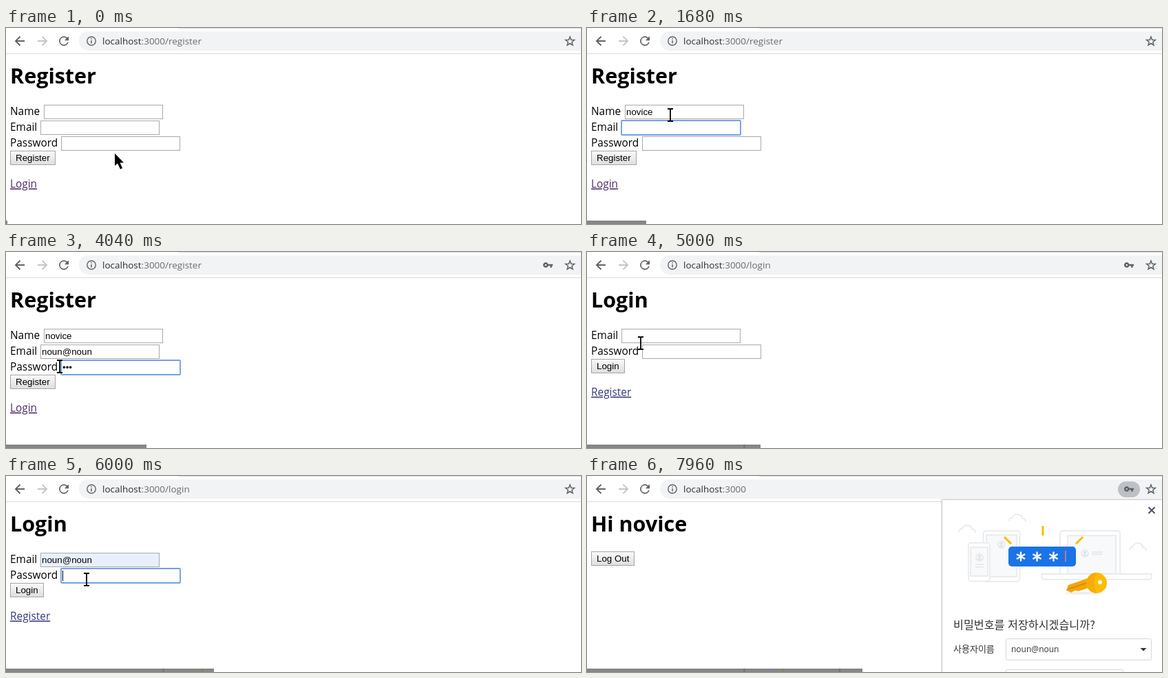
An HTML page for the animation above (8 s loop, 835 by 286 pixels).

```html
<!DOCTYPE html>
<html lang="ko">
<head>
<meta charset="utf-8">
<title>Register and log in</title>
<style>
  html, body { margin: 0; width: 100%; height: 100%; overflow: hidden; background: #fff; }
  svg { display: block; width: 835px; height: 286px; }
  text { font-family: "Open Sans", "Noto Sans", sans-serif; white-space: pre; }
  .heading { font-size: 30.5px; font-weight: 700; }
  .body { font-size: 15.4px; }
  .control { font: 13.333px "Liberation Sans", Arial, sans-serif; }
  .address { font-size: 13.5px; fill: #2b2e31; }
  .korean { font-family: "Noto Sans CJK KR", "Noto Sans CJK", sans-serif; fill: #333; }
</style>
</head>
<body>
<svg viewBox="0 0 835 286">
  <defs>
    <linearGradient id="button" x2="0" y2="1">
      <stop stop-color="#fafafa"/><stop offset="1" stop-color="#dedede"/>
    </linearGradient>
  </defs>
  <g id="toolbar">
    <path d="M250 0H835V1H250Z" fill="#dee1e6"/>
    <path d="M0 37H835V38H0Z" fill="#d9dbde"/>
    <path d="M120 5H835V33H120A14 14 0 0 1 120 5Z" fill="#f1f3f4"/>
    <g fill="none" stroke="#5f6368" stroke-width="1.9">
      <path d="M27 19H14.5M20.5 12.5L14 19L20.5 25.5"/>
      <path d="M46 19H58.5M52.5 12.5L59 19L52.5 25.5" stroke="#c3c5c8"/>
      <circle cx="124" cy="19" r="6.2" stroke-width="1.4"/>
      <path d="M124 18V22.5M124 15V16.6" stroke-width="1.5"/>
      <path id="star" stroke-width="1.5"/>
    </g>
    <path transform="translate(73.6 8.6) scale(.87)" fill="#5f6368"
      d="M17.65 6.35A7.96 7.96 0 0 0 12 4a8 8 0 1 0 7.73 10h-2.08A6 6 0 1 1 12 6c1.66 0 3.14.69 4.22 1.78L13 11h7V4z"/>
  </g>
  <g id="scene"></g>
</svg>
<script>
const LOOP = 8000, STEP = 40;
const USER = "novice", EMAIL = "noun@noun", SECRET = "•••";
const scene = document.getElementById("scene");
const ruler = document.createElement("canvas").getContext("2d");
ruler.font = '13.333px "Liberation Sans", Arial, sans-serif';

const starPoints = Array.from({ length: 10 }, (_, i) => {
  const r = i % 2 ? 2.9 : 6.8, a = i * Math.PI / 5;
  return `${819 + r * Math.sin(a)} ${19.6 - r * Math.cos(a)}`;
});
document.getElementById("star").setAttribute("d", `M${starPoints.join("L")}Z`);

// Pointer hotspot: time, x, y
const pointerPath = [
  [0, 158, 183], [160, 158, 183], [400, 121, 127], [3640, 121, 127],
  [4000, 78, 167], [4040, 78, 167], [4160, 44, 188], [4440, 44, 188],
  [4840, 78, 133], [5080, 78, 133], [5240, 100, 124], [5640, 100, 124],
  [5840, 117, 151], [6400, 117, 151], [6680, 34, 170], [7280, 34, 170],
  [7560, 237, 199], [7680, 250, 290], [LOOP, 250, 290]
];

const clamp = v => Math.max(0, Math.min(1, v));
const between = (t, from, to) => t >= from && t < to;
const typed = (word, t, start, gap) =>
  word.slice(0, Math.max(0, Math.floor((t - start) / gap) + 1));
const text = (cls, x, y, content, extra = "") =>
  `<text class="${cls}" x="${x}" y="${y}" ${extra}>${content}</text>`;
const box = (x, y, w, h, extra) =>
  `<rect x="${x}" y="${y}" width="${w}" height="${h}" ${extra}/>`;

function pointerAt(t) {
  const i = pointerPath.findIndex((p, n) => n && t <= p[0]);
  const [t0, x0, y0] = pointerPath[i - 1], [t1, x1, y1] = pointerPath[i];
  const p = (t - t0) / (t1 - t0), e = p * p * (3 - 2 * p);
  return [x0 + (x1 - x0) * e, y0 + (y1 - y0) * e];
}

function pointer(t) {
  const [x, y] = pointerAt(t);
  const beam = between(t, 320, 4120) || between(t, 4640, 6560);
  return `<g transform="translate(${x} ${y})">` + (beam
    ? `<path d="M-4 -9H-1L0 -8L1 -9H4M0 -8V8M-4 9H-1L0 8L1 9H4" fill="none" stroke="#000" stroke-width="1.8"/>`
    : `<path d="M0 0V18L4 14.5L8 23L11 21.5L7.5 13.5H13Z"/>`) + "</g>";
}

// blinkFrom is the moment the caret last became solid
function field(label, x, y, value, { focus, blinkFrom, t, fill = "#fff" }) {
  let out = text("body", 6, y + 15, label) +
    box(x + .5, y + .5, 172, 20, `fill="${fill}" stroke="#a9a9a9"`) +
    text("control", x + 2, y + 15, value);
  if (focus) {
    out += box(x, y, 173, 21, 'rx="1" fill="none" stroke="#729fe9" stroke-width="1.8"');
    if ((t - blinkFrom) % 1000 < 500)
      out += box(Math.round(x + 2 + ruler.measureText(value).width), y + 3, 1, 15, "");
  }
  return out;
}

const button = (label, y, w, pressed) =>
  box(6.5, y + .5, w - 1, 20, `fill="${pressed ? "#d5d5d5" : "url(#button)"}" stroke="#a6a6a6"`) +
  text("control", 14, y + 15, label);

const link = (label, y, color) =>
  text("body", 6, y, label, `fill="${color}" text-decoration="underline"`);

function registerPage(t) {
  const lastKey = (focusTime, start, gap, count) =>
    t < start ? focusTime : Math.min(t, start + gap * (count - 1));
  return text("heading", 6, 81, "Register") +
    field("Name", 55, 112, typed(USER, t, 640, 80),
      { t, focus: between(t, 440, 1160), blinkFrom: lastKey(440, 640, 80, 6) }) +
    field("Email", 50, 135, typed(EMAIL, t, 1760, 80),
      { t, focus: between(t, 1160, 2720), blinkFrom: lastKey(1160, 1760, 80, 9) }) +
    field("Password", 80, 158, typed(SECRET, t, 3240, 120),
      { t, focus: t >= 2720, blinkFrom: lastKey(2720, 3240, 120, 3) }) +
    button("Register", 179, 66, t >= 4160) + link("Login", 233, "#4f2a68");
}

function loginPage(t) {
  const filled = t >= 5600;
  return text("heading", 6, 81, "Login") +
    field("Email", 50, 112, filled ? EMAIL : "",
      { t, focus: between(t, 5280, 5840), blinkFrom: 5280, fill: filled ? "#e8f0fe" : "#fff" }) +
    field("Password", 80, 135, typed(SECRET, t, 6120, 120),
      { t, focus: t >= 5840, blinkFrom: t < 6120 ? 5840 : Math.min(t, 6360) }) +
    button("Login", 156, 49, t >= 6800) + link("Register", 210, "#34397c");
}

const homePage = () => text("heading", 6, 81, `Hi ${USER}`) + button("Log Out", 110, 63);

function keyIcon(t) {
  if (!(between(t, 3440, 5200) || t >= 6160)) return "";
  const shade = t < 7160 ? "none" : t < 7320 ? "#e3e5e7" : "#bdc1c6";
  return box(771, 8, 32, 23, `rx="11.5" fill="${shade}"`) +
    `<path transform="translate(779.3 11.3) scale(.64)" fill="#5f6368" fill-rule="evenodd"
      d="M12.65 10A6 6 0 1 0 12.65 14H17V18H21V14H23V10ZM7 14A2 2 0 1 1 7 10A2 2 0 1 1 7 14Z"/>`;
}

const cloud = (x, y) =>
  `<path d="M${x} ${y}q0 -5 5 -5q2 -6 8 -5q6 1 6 6q5 0 5 5"/>`;
const person = (x, y) =>
  `<circle cx="${x}" cy="${y}" r="5"/><circle cx="${x}" cy="${y - 1.5}" r="1.6" fill="#dadce0"/>
   <path d="M${x - 3} ${y + 3}q3 -3 6 0Z" fill="#dadce0"/>`;
const asterisk = x => [0, 60, 120].map(a =>
  `<path d="M${x - 7} 117.5H${x + 7}" transform="rotate(${a + 90} ${x} 117.5)"/>`).join("");

const illustration = `
  <g fill="none" stroke="#e4e6e9" stroke-width="1.4">
    ${cloud(540, 82)}${cloud(613, 66)}${cloud(788, 108)}
    <rect x="575.5" y="80" width="53" height="74" rx="4" fill="#fff"/>
    <rect x="580" y="86" width="44" height="61" fill="#f8f9fa"/>
    <rect x="554" y="97.5" width="31" height="56" rx="4" fill="#fff"/>
    <rect x="557" y="104" width="25" height="42" fill="#f8f9fa"/>
    <path d="M687 143V84Q687 80 691 80H770Q774 80 774 84V143" fill="#fff"/>
    <rect x="698" y="87" width="70" height="56" fill="#f8f9fa"/>
    <path d="M660 143H820V147Q820 151 815 151H665Q660 151 660 147Z" fill="#fff"/>
    ${person(602, 100)}${person(570, 119)}${person(723, 113)}
    <path d="M564 129H576M564 133H576M733 111H749M733 114H749"/>
  </g>
  <ellipse cx="722" cy="171" rx="28" ry="2" fill="#eceef0"/>
  <rect x="612" y="103" width="98" height="29" rx="5" fill="#1a73e8"/>
  <g stroke="#fff" stroke-width="2.4">${[630, 653.5, 677.5].map(asterisk).join("")}</g>
  <path d="M695 109V125" stroke="#ee7b55" stroke-width="1.6"/>
  <path d="M606 89L616 99M662 73V87M720 89L710 99" stroke="#fbbc04" stroke-width="3"/>
  <path d="M728 149L699 159L696 167L703 170L709 167L714 168L732 162Z" fill="#f2a60c"/>
  <path d="M699 165L729 155" stroke="#d98b0b" stroke-width="2"/>
  <circle cx="740" cy="156" r="15" fill="#fbbc04"/>
  <path d="M740 141A15 15 0 0 0 740 171Q733 156 740 141Z" fill="#f5ad08"/>
  <circle cx="745" cy="155" r="3" fill="#fff"/>`;

const popupContent =
  box(513.5, 33, 330, 300, 'fill="#000" opacity=".06"') +
  box(515.5, 34.5, 321, 300, 'rx="2" fill="#fff" stroke="#c6c8ca"') +
  '<path d="M815.5 45.5L824.5 54.5M824.5 45.5L815.5 54.5" stroke="#4c4a66" stroke-width="1.9"/>' +
  illustration +
  text("korean", 532, 223, "비밀번호를 저장하시겠습니까?", 'font-size="16.2"') +
  text("korean", 532, 257, "사용자이름", 'font-size="13"') +
  box(608.5, 237.5, 211, 31, 'rx="2" fill="#fff" stroke="#d5d7da"') +
  text("", 616, 257, EMAIL, 'font-size="12" fill="#333"') +
  '<path d="M803.5 251H812.5L808 255.5Z" fill="#333"/>' +
  box(608.5, 282.5, 170, 31, 'rx="2" fill="#fff" stroke="#d5d7da"');

function popup(t) {
  const p = clamp((t - 7160) / 260);
  if (!p) return "";
  const scale = .943 + .057 * p;
  return `<g opacity="${p}" transform="translate(673 228) scale(${scale}) translate(-673 -228)">${popupContent}</g>`;
}

function progress(t) {
  const width = 2 + t / 20;
  const marks = [[227, 3, "#777"], [262, 2, "#8180b4"], [284, 2, "#85855e"], [366, 2, "#737373"]];
  return box(0, 281, width, 5, 'fill="#888585"') +
    marks.filter(m => m[0] + m[1] <= width)
      .map(([x, w, color]) => box(x, 281, w, 5, `fill="${color}"`)).join("");
}

function render(t) {
  const [path, page] = t < 4320 ? ["/register", registerPage]
    : t < 6920 ? ["/login", loginPage] : ["", homePage];
  scene.innerHTML =
    text("address", 140, 24, `localhost<tspan fill="#686c71">:3000${path}</tspan>`) +
    keyIcon(t) + page(t) + progress(t) + popup(t) + pointer(t);
}

let shown = -1;
const started = performance.now();
function tick() {
  const elapsed = Math.max(0, performance.now() - started) % LOOP;
  const t = Math.floor(elapsed / STEP) * STEP;
  if (t !== shown) render(shown = t);
  requestAnimationFrame(tick);
}
tick();
</script>
</body>
</html>
```
